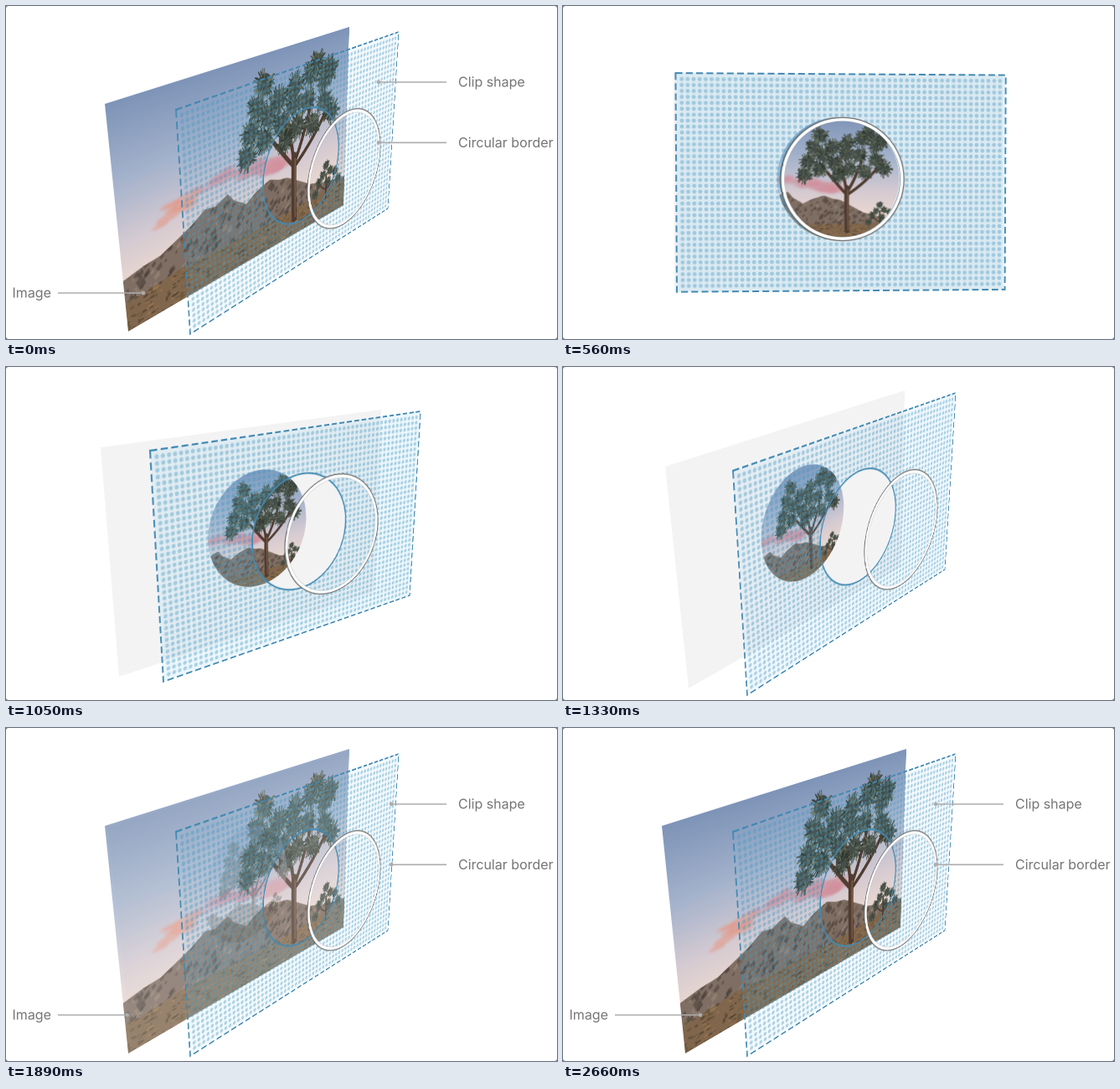
Recreate the animation shown at these times as an HTML page with a canvas. Size 658 px wide and 398 px high, loop 2730 ms.

```html
<!DOCTYPE html>
<html lang="en">
<head>
<meta charset="utf-8">
<title>Clipped image layers</title>
<style>
  html, body { margin: 0; width: 100%; height: 100%; overflow: hidden; background: #666; }
  #stage { position: relative; width: 658px; height: 398px; overflow: hidden; background: #fff; border-radius: 3px; }
  canvas { position: absolute; left: 0; top: 0; transform-origin: 0 0; }
</style>
</head>
<body>
<div id="stage"></div>
<script>
const LOOP = 2730, STEP = 70;
const W = 393, H = 259, PAD = 4, RES = 2;
const HOLE = { x: 194.5, y: 125, r: 72 };
const TAU = Math.PI * 2;
const stage = document.getElementById('stage');

// Corners run clockwise from top left.
const TIMES = [450, 770, 1050, 1330];
const SHEET = [
  [137, 83, 530, 83, 530, 342, 137, 342],
  [133, 75, 520, 77, 514, 320, 141, 346],
  [172, 100, 495, 53, 482, 273, 188, 376],
  [203, 124, 469, 31, 456, 242, 220, 392]
];
const BACK = [
  SHEET[0],
  [113, 73, 502, 76, 497, 318, 122, 344],
  [113, 96, 448, 51, 439, 269, 135, 370],
  [122, 119, 408, 28, 403, 239, 150, 384]
];
const PHOTO_QUAD = [118, 117, 410, 25, 403, 238, 146, 389];

let seed = 7;
function rnd(a = 0, b = 1) {
  seed = (seed * 16807) % 2147483647;
  return a + (b - a) * seed / 2147483647;
}
const pick = list => list[Math.floor(rnd() * list.length)];
const clamp01 = v => Math.max(0, Math.min(1, v));
function ease(t, from, to) {
  const u = clamp01((t - from) / (to - from));
  return u * u * (3 - 2 * u);
}

function makeCanvas(w, h) {
  const c = document.createElement('canvas');
  c.width = w * RES;
  c.height = h * RES;
  c.style.width = w + 'px';
  c.style.height = h + 'px';
  stage.appendChild(c);
  const g = c.getContext('2d');
  g.scale(RES, RES);
  return { c, g };
}

function layer(paint) {
  const { c, g } = makeCanvas(W + 2 * PAD, H + 2 * PAD);
  g.translate(PAD, PAD);
  paint(g);
  return c;
}

function disc(g, x, y, rx, ry = rx) {
  g.beginPath();
  g.ellipse(x, y, rx, ry, 0, 0, TAU);
}

function polygon(g, points) {
  g.beginPath();
  points.forEach(([u, v]) => g.lineTo(u * W, v * H));
  g.closePath();
}

function line(g, x1, y1, x2, y2) {
  g.beginPath();
  g.moveTo(x1, y1);
  g.lineTo(x2, y2);
  g.stroke();
}

function paintSky(g) {
  const sky = g.createLinearGradient(0, 0, 0, H * 0.8);
  sky.addColorStop(0, '#7e94b8');
  sky.addColorStop(0.4, '#a5b3cc');
  sky.addColorStop(0.75, '#d6cbd2');
  sky.addColorStop(1, '#ecd9d0');
  g.fillStyle = sky;
  g.fillRect(0, 0, W, H);

  g.save();
  g.filter = 'blur(3px)';
  for (let i = 0; i < 60; i++) {
    const s = rnd();
    const y = 0.555 - 0.1 * Math.sin(s * 1.9) + s * s * 0.12 + rnd(-0.025, 0.04);
    g.fillStyle = s < 0.25 ? 'rgba(232,150,130,.55)' : 'rgba(212,145,158,.5)';
    disc(g, (0.14 + s * 0.54) * W, y * H, rnd(8, 20), rnd(2, 5.5));
    g.fill();
  }
  g.restore();
}

function paintRocks(g) {
  g.save();
  polygon(g, [
    [0, .755], [.07, .735], [.134, .727], [.2, .69], [.255, .659], [.31, .615], [.35, .625],
    [.405, .595], [.43, .64], [.484, .69], [.52, .66], [.56, .64], [.594, .625], [.64, .65],
    [.68, .66], [.74, .71], [.8, .76], [.9, .8], [1, .82], [1, 1], [0, 1]
  ]);
  g.clip();
  g.fillStyle = '#7f6e63';
  g.fillRect(0, 0, W, H);
  for (let i = 0; i < 420; i++) {
    const x = rnd(0, W), y = rnd(0.58, 0.9) * H, s = rnd(3, 9);
    g.fillStyle = pick(['rgba(72,60,54,.5)', 'rgba(160,140,124,.5)', 'rgba(112,95,84,.6)', 'rgba(55,47,44,.45)']);
    g.beginPath();
    g.moveTo(x, y);
    g.lineTo(x + s, y - s * 0.7);
    g.lineTo(x + s * 1.2, y + 1);
    g.lineTo(x + s * 0.3, y + s * 0.6);
    g.fill();
  }
  g.fillStyle = '#80664c';
  polygon(g, [[0, .87], [.2, .84], [.4, .85], [.6, .86], [.8, .85], [1, .84], [1, 1], [0, 1]]);
  g.fill();
  for (let i = 0; i < 380; i++) {
    g.fillStyle = pick(['rgba(70,56,40,.55)', 'rgba(158,122,82,.5)', 'rgba(96,82,56,.6)']);
    disc(g, rnd(0, W), rnd(0.85, 1) * H, rnd(1, 5), rnd(0.7, 2));
    g.fill();
  }
  g.restore();
}

function branch(g, u1, v1, cu, cv, u2, v2, width) {
  g.lineWidth = width;
  g.beginPath();
  g.moveTo(u1 * W, v1 * H);
  g.quadraticCurveTo(cu * W, cv * H, u2 * W, v2 * H);
  g.stroke();
}

function tuft(g, u, v, r) {
  g.fillStyle = 'rgba(52,60,52,.85)';
  disc(g, u * W, v * H, r * 0.72);
  g.fill();
  g.lineWidth = Math.max(0.7, r * 0.09);
  for (let i = 0; i < 75; i++) {
    const a = rnd(0, TAU), d = r * Math.sqrt(rnd()) * 0.8;
    const x = u * W + Math.cos(a) * d, y = v * H + Math.sin(a) * d;
    g.strokeStyle = pick(['#2c342d', '#3d493f', '#566253', '#6d7764', '#485047']);
    line(g, x, y, x + Math.cos(a) * r * 0.3, y + Math.sin(a) * r * 0.3);
  }
}

function paintTrees(g) {
  g.lineCap = 'round';
  g.strokeStyle = '#503c30';
  branch(g, .716, .91, .712, .75, .715, .56, 10);
  branch(g, .715, .62, .66, .53, .58, .38, 6);
  branch(g, .715, .6, .70, .48, .68, .33, 6);
  branch(g, .715, .6, .76, .5, .81, .28, 6);
  branch(g, .715, .62, .82, .52, .9, .36, 6);
  g.strokeStyle = '#7b5b47';
  branch(g, .722, .9, .718, .75, .72, .58, 2.5);

  const tufts = [
    [.49, .46], [.51, .35], [.54, .24], [.575, .14], [.59, .3], [.57, .41], [.64, .24], [.65, .37],
    [.71, .29], [.72, .2], [.73, .41], [.78, .3], [.8, .17], [.83, .13], [.87, .22],
    [.87, .34], [.9, .18], [.91, .41], [.81, .43], [.67, .46]
  ];
  tufts.forEach(([u, v]) => tuft(g, u, v, 18));

  g.strokeStyle = '#4b3a2e';
  branch(g, .89, .89, .89, .82, .89, .75, 3);
  branch(g, .89, .84, .86, .82, .85, .78, 2);
  branch(g, .89, .84, .93, .82, .94, .77, 2);
  [[.89, .7], [.87, .75], [.91, .74], [.85, .78], [.94, .76], [.9, .8], [.83, .84], [.96, .81]]
    .forEach(([u, v]) => tuft(g, u, v, 7.5));
}

function paintPhoto(g) {
  seed = 7;
  g.save();
  g.beginPath();
  g.rect(0, 0, W, H);
  g.clip();
  paintSky(g);
  paintRocks(g);
  paintTrees(g);
  g.restore();
}

function paintRoundPhoto(g) {
  disc(g, HOLE.x, HOLE.y, 73);
  g.clip();
  g.translate(43, 52);
  g.scale(226 / W, 149 / H);
  paintPhoto(g);
}

function clipOutHole(g) {
  g.beginPath();
  g.rect(0, 0, W, H);
  g.moveTo(HOLE.x + HOLE.r, HOLE.y);
  g.arc(HOLE.x, HOLE.y, HOLE.r, 0, TAU);
  g.clip('evenodd');
}

function paintTint(g) {
  clipOutHole(g);
  g.fillStyle = 'rgba(120,195,230,.19)';
  g.fillRect(0, 0, W, H);
}

function paintMesh(g) {
  g.save();
  clipOutHole(g);
  g.fillStyle = 'rgba(70,150,190,.4)';
  const px = W / 56, py = H / 37;
  for (let x = px; x < W - 2; x += px) {
    for (let y = py; y < H - 2; y += py) {
      disc(g, x, y, 2.4);
      g.fill();
    }
  }
  g.restore();
  g.strokeStyle = '#4289b3';
  g.lineWidth = 1.9;
  disc(g, HOLE.x, HOLE.y, HOLE.r);
  g.stroke();
  g.setLineDash([8, 4]);
  g.strokeRect(0, 0, W, H);
}

function paintBorder(g) {
  const ring = (r, width, color) => {
    g.lineWidth = width;
    g.strokeStyle = color;
    disc(g, HOLE.x, HOLE.y, r);
    g.stroke();
  };
  ring(73.4, 1.7, '#686868');
  ring(69.4, 0.9, 'rgba(100,100,100,.45)');
  ring(71.2, 3.6, '#fff');
}

const placeholder = layer(g => {
  g.fillStyle = '#f3f3f4';
  g.fillRect(0, 0, W, H);
});
const photo = layer(paintPhoto);
const roundPhoto = layer(paintRoundPhoto);
const tint = layer(paintTint);
const mesh = layer(paintMesh);
const border = layer(paintBorder);
const notes = makeCanvas(658, 398);

// Smooth interpolation through the poses, at rest on both ends.
function pose(keys, t) {
  const last = TIMES.length - 1;
  if (t <= TIMES[0]) return keys[0];
  if (t >= TIMES[last]) return keys[last];
  const i = TIMES.findIndex(k => k > t) - 1;
  const span = TIMES[i + 1] - TIMES[i];
  const u = (t - TIMES[i]) / span, u2 = u * u, u3 = u2 * u;
  const slope = (k, n) => k === 0 || k === last ? 0
    : (keys[k + 1][n] - keys[k - 1][n]) / (TIMES[k + 1] - TIMES[k - 1]) * span;
  return keys[i].map((v, n) =>
    (2 * u3 - 3 * u2 + 1) * v + (3 * u2 - 2 * u3) * keys[i + 1][n] +
    (u3 - 2 * u2 + u) * slope(i, n) + (u3 - u2) * slope(i + 1, n));
}

function place(el, [x0, y0, x1, y1, x2, y2, x3, y3]) {
  const ax = x1 - x2, ay = y1 - y2, bx = x3 - x2, by = y3 - y2;
  const sx = x0 - x1 + x2 - x3, sy = y0 - y1 + y2 - y3;
  const det = ax * by - bx * ay;
  const p = (sx * by - bx * sy) / det, q = (ax * sy - sx * ay) / det;
  const m = [
    (x1 - x0 + p * x1) / W, (y1 - y0 + p * y1) / W, 0, p / W,
    (x3 - x0 + q * x3) / H, (y3 - y0 + q * y3) / H, 0, q / H,
    0, 0, 1, 0,
    x0, y0, 0, 1
  ].map(v => v.toFixed(8));
  el.style.transform = `matrix3d(${m}) translate(${-PAD}px, ${-PAD}px)`;
}

function drawNotes(textAlpha, grow) {
  const g = notes.g;
  g.clearRect(0, 0, 658, 398);
  g.font = '16px Inter, "Liberation Sans", sans-serif';
  const note = (text, x, y, from, to) => {
    g.globalAlpha = textAlpha;
    g.fillStyle = '#757575';
    g.fillText(text, x, y + 5.7);
    if (grow <= 0) return;
    const end = from + (to - from) * grow;
    g.globalAlpha = 1;
    g.strokeStyle = g.fillStyle = '#acacac';
    g.lineWidth = 1.6;
    line(g, from, y, end, y);
    disc(g, end, y, 2.3);
    g.fill();
  };
  note('Clip shape', 540, 91, 526, 445);
  note('Circular border', 540, 163.3, 526, 445);
  note('Image', 7.5, 343, 62, 164);
}

function render(now) {
  let t = Math.floor((now % LOOP) / STEP) * STEP;
  if (t < STEP) t = LOOP; // the loop opens on the finished view
  const sheet = pose(SHEET, t), back = pose(BACK, t);
  const reveal = ease(t, 1500, 2040);

  place(placeholder, back);
  place(roundPhoto, back);
  place(photo, PHOTO_QUAD);
  place(tint, sheet);
  place(mesh, sheet);
  place(border, sheet.map((v, n) => v + 0.78 * (v - back[n])));

  photo.style.opacity = reveal;
  roundPhoto.style.opacity = 1 - reveal * reveal;
  tint.style.opacity = 1 - 0.35 * ease(t, 600, 1330) - 0.25 * reveal;
  drawNotes(ease(t, 1400, 1680), reveal);
}

const start = performance.now();
function tick() {
  render(performance.now() - start);
  requestAnimationFrame(tick);
}
tick();
</script>
</body>
</html>
```
